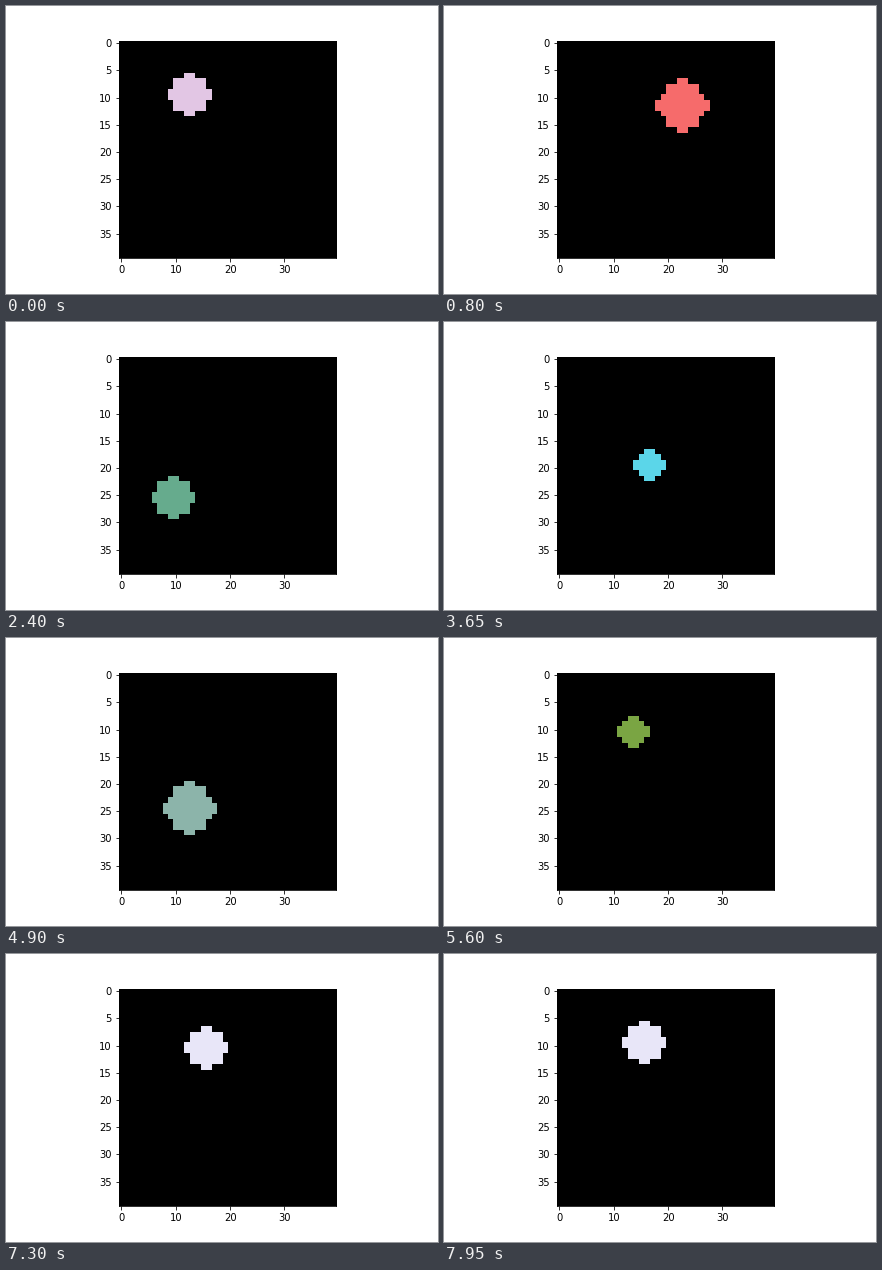
Animation of 432x288 px, one loop 8000 ms. Source, as a matplotlib script:

```python
import numpy as np
import matplotlib.pyplot as plt
from matplotlib.animation import FuncAnimation

SIZE = 40
CLIP = 16
CLIPS = 10

# start x, start y, velocity x, velocity y, radius, colour
BALLS = [
    (13, 10, -1, -2, 4, "#e2c6e4"),
    (23, 12, 1, 1, 5, "#f66b6b"),
    (10, 29, 0, 0, 4, "#a896be"),
    (10, 26, 0, -1, 4, "#66ab8d"),
    (17, 11, 0, 1, 3, "#5bd6e9"),
    (12, 10, 0, 0, 4, "#c8a078"),
    (17, 29, -2, -2, 5, "#8cb4aa"),
    (14, 11, 0, -1, 3, "#7aa543"),
    (28, 11, 1, 1, 4, "#e8ac88"),
    (16, 13, 0, -1, 4, "#e8e6f8"),
]


def bounce(pos, vel, r, steps):
    for _ in range(steps):
        pos += vel
        if pos - r <= 0 or pos + r >= SIZE:
            vel = -vel
    return pos


def half_spans(r):
    """Half height of each column, counted outwards from the centre."""
    spans = {0: r}
    a, b = 0, r * 64
    while True:
        a += b // r
        b -= a // r
        h, i = (a + 8) >> 6, (b + 8) >> 6
        spans.setdefault(i, h)
        spans.setdefault(h, i)
        if i <= h:
            return spans


def draw_ball(x, y, r, color):
    img = np.zeros((SIZE, SIZE, 3), np.uint8)
    rgb = [int(color[k:k + 2], 16) for k in (1, 3, 5)]
    for col, half in half_spans(r).items():
        for cx in (x - col - 1, x + col):
            if 0 <= cx < SIZE:
                img[max(0, y - half):max(0, y + half), cx] = rgb
    return img


def scene(n):
    clip, step = divmod(n, CLIP)
    x, y, vx, vy, r, color = BALLS[clip]
    return draw_ball(bounce(x, vx, r, step), bounce(y, vy, r, step), r, color)


plt.rcParams.update({"font.family": "DejaVu Sans", "font.size": 10})
fig = plt.figure(figsize=(6, 4), dpi=72, facecolor="white")
fig.subplots_adjust(left=0.125, right=0.9, bottom=0.125, top=0.88)
ax = fig.add_subplot()
picture = ax.imshow(scene(0), interpolation="nearest")
ax.set_xticks(range(0, SIZE, 10))
ax.set_yticks(range(0, SIZE, 5))


def update(n):
    picture.set_data(scene(n))
    return [picture]


anim = FuncAnimation(fig, update, frames=CLIP * CLIPS, interval=50,
                     repeat=True, repeat_delay=0)
plt.show()
```
